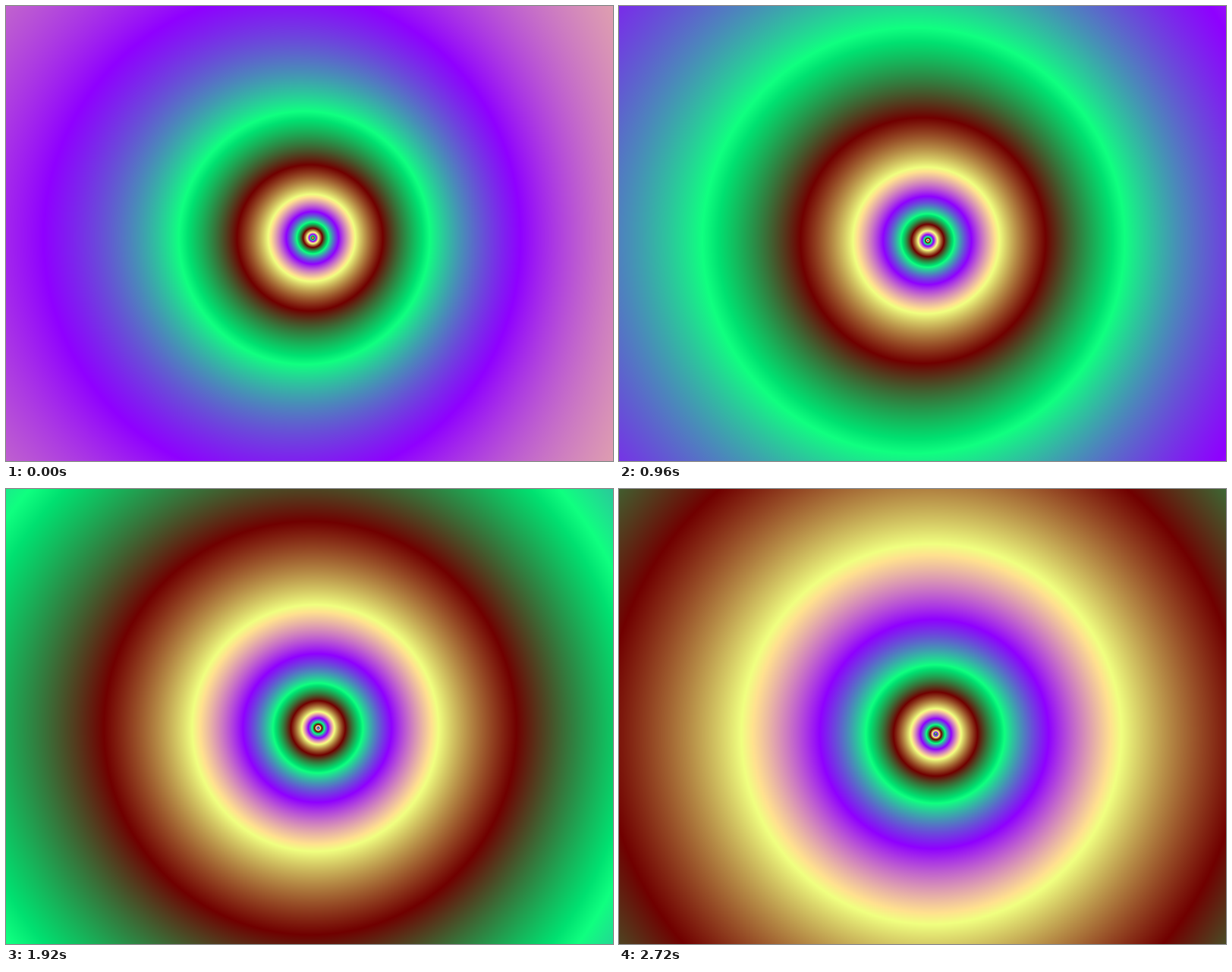
Recreate the animation shown at these times as an HTML page with a canvas. Size 800 by 600 pixels, loop 2.88 s.

```html
<!DOCTYPE html>
<html lang="en">
<head>
<meta charset="utf-8">
<title>Ring zoom</title>
<style>
  html, body { margin: 0; width: 100%; height: 100%; overflow: hidden; background: #000; }
  canvas { display: block; width: 800px; height: 600px; }
</style>
</head>
<body>
<canvas id="stage" width="800" height="600"></canvas>
<script>
const W = 800, H = 600;
const STEP_MS = 160, STEPS = 18, STEPS_PER_DOUBLING = 8;
const UNIT = 2440;                // pixels per plane unit before zooming
const POLE = { x: 3.9, y: 5.2 };  // ring centre, relative to the zoom centre
const TONES = 4096;

const ctx = document.getElementById('stage').getContext('2d');

// Triangle wave of period 2: 0 at even numbers, 255 at odd ones.
const tri = x => 255 * (1 - Math.abs(((x % 2) + 2) % 2 - 1));

// One colour cycle spans four units: green, violet, yellow, dark red.
const palette = new Uint32Array(TONES);
for (let i = 0; i < TONES; i++) {
  const q = i * 4 / TONES;
  const r = Math.round(tri(q / 2 + 0.06));
  const g = Math.round(tri(q + 1));
  const b = Math.round(tri(q / 2 + 0.5));
  palette[i] = (255 << 24 | b << 16 | g << 8 | r) >>> 0;
}

// Colour follows the multiplier |1 - sqrt(1 - 4c)| of the fixed point of z² + c.
function render(step) {
  const zoom = 2 ** (step / STEPS_PER_DOUBLING);
  const scale = 4 / (UNIT * zoom);
  const px = W / 2 + POLE.x * zoom, py = H / 2 + POLE.y * zoom;
  const image = ctx.createImageData(W, H);
  const out = new Uint32Array(image.data.buffer);
  for (let y = 0, i = 0; y < H; y++) {
    const im = (y - py) * scale;
    for (let x = 0; x < W; x++, i++) {
      const re = 1 - (x - px) * scale;
      const m = Math.sqrt(re * re + im * im);
      const mult = Math.max(1e-12, 1 + m - Math.sqrt(2 * (m + re)));
      const q = Math.log(mult / (1 + 7.8 * mult)) + 8.13;
      out[i] = palette[Math.floor(q * TONES / 4) & (TONES - 1)];
    }
  }
  return image;
}

const cache = [];
let shown = -1;

function draw(now) {
  const step = Math.floor(now / STEP_MS) % STEPS;
  if (step !== shown) {
    cache[step] = cache[step] || render(step);
    ctx.putImageData(cache[step], 0, 0);
    shown = step;
  }
}

const start = performance.now();
function tick() {
  draw(performance.now() - start);
  requestAnimationFrame(tick);
}
tick();
</script>
</body>
</html>
```
